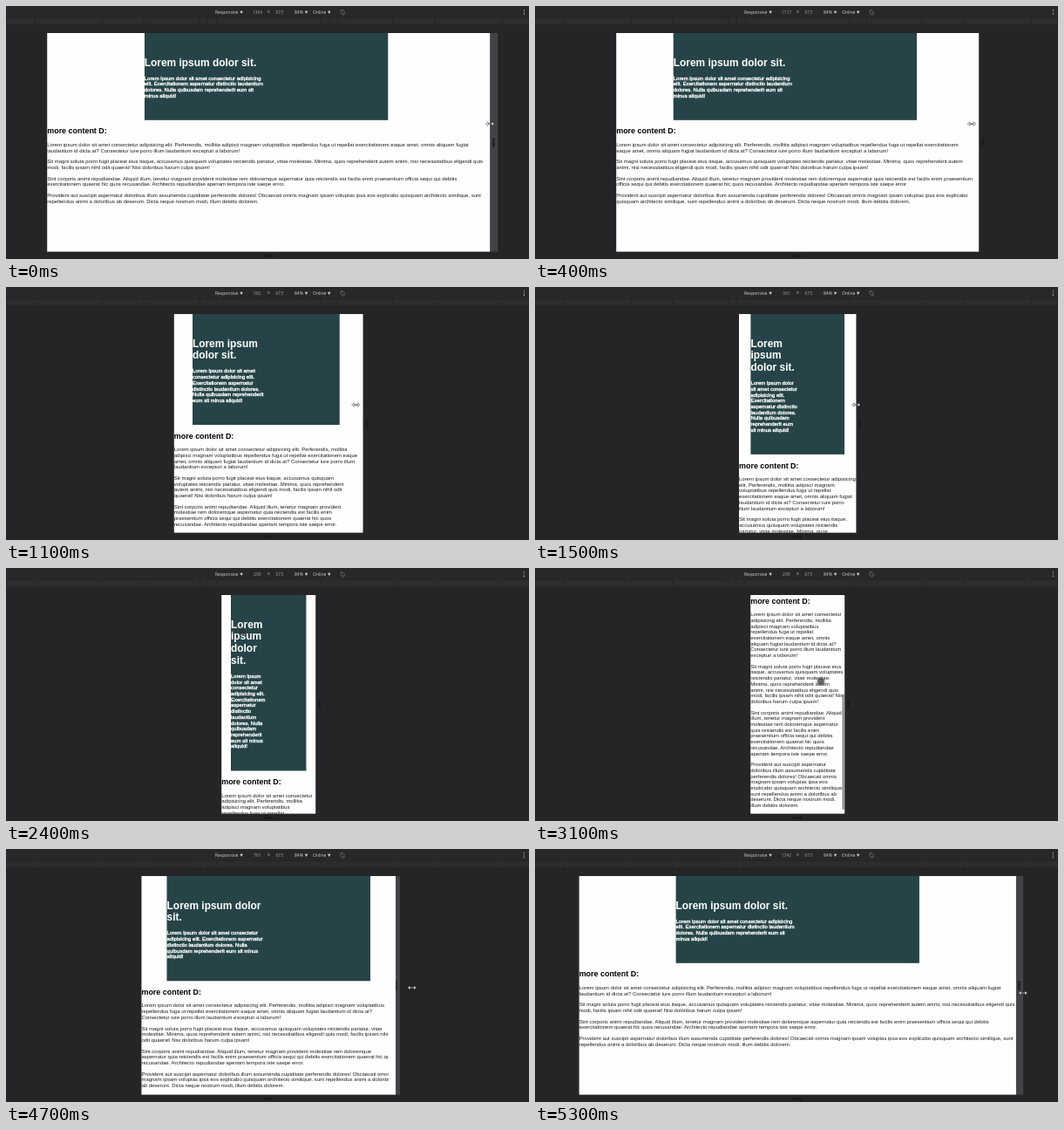
Recreate the animation shown at these times as an HTML page. Size 600 by 290 pixels, loop 5400 ms.

```html
<!DOCTYPE html>
<html lang="en">
<head>
<meta charset="utf-8">
<title>Responsive layout preview</title>
<style>
  html, body { margin: 0; width: 100%; height: 100%; overflow: hidden; background: #252427; }
  #stage { position: relative; width: 600px; height: 290px; overflow: hidden; background: #252427; }
  svg { position: absolute; inset: 0; font: 5px "Open Sans", sans-serif; }
  #device {
    position: absolute; top: 31px; left: 0; height: 673px; overflow: hidden;
    background: #fffefe; transform-origin: 0 0;
  }
  #clip { height: 100%; overflow: hidden; }
  #page { display: flow-root; font: 16px/18px "Liberation Sans", Arial, sans-serif; color: #000; }
  #page header {
    display: flow-root; box-sizing: border-box; width: 80%; max-width: 750px;
    margin: 0 auto; padding: 50.5px 0 49.5px; background: #264448; color: #fff;
  }
  header > * { width: 50%; }
  h1 { font-size: 32px; line-height: 37px; margin: 21.44px 0; }
  h2 { font-size: 24px; line-height: 27px; margin: 19.92px 0; }
  p { margin: 16px 0; color: #1c1c1c; }
  /* bold weight on regular advance widths */
  header p { color: #fff; -webkit-text-stroke: .9px #fff; }
</style>
</head>
<body>
<div id="stage">
  <svg width="600" height="290">
    <rect width="600" height="13" fill="#28272a"/>
    <rect y="14" width="600" height="7" fill="#2d2c2f"/>
    <g id="ticks" stroke="#232225" stroke-width=".8"></g>
    <g fill="#d3d3d5">
      <text x="240" y="9.2">Responsive</text>
      <text x="331" y="9.2">84%</text>
      <text x="352" y="9.2">Online</text>
      <path d="M268.4 5.7h3.4l-1.7 3.2zM342.8 5.7h3.4l-1.7 3.2zM369 5.7h3.4l-1.7 3.2z"/>
      <path d="M594.4 4.6v.01M594.4 7v.01M594.4 9.4v.01" stroke="#d3d3d5" stroke-width="1.2" stroke-linecap="round"/>
    </g>
    <g fill="#a2a2a6" text-anchor="middle">
      <text id="width" x="288.4" y="9.2"></text>
      <text x="301.3" y="9.2" font-size="6.5">×</text>
      <text x="313.8" y="9.2">673</text>
    </g>
    <g fill="none" stroke="#77777b" stroke-width=".7">
      <rect x="384.6" y="5.2" width="3" height="4" transform="rotate(45 386.1 7.2)"/>
      <path d="M383.4 6.2a3 3 0 0 1 2.7-2.2M388.8 8.2a3 3 0 0 1-2.7 2.2"/>
    </g>
    <rect x="296" y="285" width="10" height="3" fill="#1b1a1d"/>
    <g id="handle">
      <rect id="strip" y="31" width="9" height="250.6" fill="#434346"/>
      <rect x="2.8" y="151" width="3" height="11" fill="#1b1a1d" opacity=".7"/>
    </g>
  </svg>

  <div id="device"><div id="clip"><div id="page">
    <header>
      <h1>Lorem ipsum dolor sit.</h1>
      <p>Lorem ipsum dolor sit amet consectetur adipisicing elit. Exercitationem aspernatur distinctio laudantium dolores. Nulla quibusdam reprehenderit eum sit minus aliquid!</p>
    </header>
    <h2>more content D:</h2>
    <p>Lorem ipsum dolor sit amet consectetur adipisicing elit. Perferendis, mollitia adipisci magnam voluptatibus repellendus fuga ut repellat exercitationem eaque amet, omnis aliquam fugiat laudantium id dicta at? Consectetur iure porro illum laudantium excepturi a laborum!</p>
    <p>Sit magni soluta porro fugit placeat eius itaque, accusamus quisquam voluptates reiciendis pariatur, vitae molestiae. Minima, quos reprehenderit autem animi, nisi necessitatibus eligendi quis modi, facilis ipsam nihil odit quaerat! Nisi doloribus harum culpa ipsam!</p>
    <p>Sint corporis animi repudiandae. Aliquid illum, tenetur magnam provident molestiae rem doloremque aspernatur quia reiciendis est facilis enim praesentium officia sequi qui debitis exercitationem quaerat hic quos recusandae. Architecto repudiandae aperiam tempora iste saepe error.</p>
    <p>Provident aut suscipit aspernatur doloribus illum assumenda cupiditate perferendis dolores! Obcaecati omnis magnam ipsam voluptas ipsa eos explicabo quisquam architecto similique, sunt repellendus animi a doloribus ab deserunt. Dicta neque nostrum modi, illum debitis dolorem.</p>
  </div></div></div>

  <svg width="600" height="290">
    <defs><radialGradient id="soft">
      <stop offset=".55" stop-color="#333" stop-opacity=".75"/>
      <stop offset="1" stop-color="#555" stop-opacity=".1"/>
    </radialGradient></defs>
    <rect id="thumb" x="352.6" y="145" width="2" height="132" rx="1" fill="#808080"/>
    <circle id="touch" r="5.4" fill="url(#soft)"/>
    <path id="arrows" d="M-4.8 0l2.6-2.2v1.7h4.4v-1.7l2.6 2.2-2.6 2.2v-1.7h-4.4v1.7z" fill="#fff" stroke="#222" stroke-width=".5"/>
  </svg>
</div>
<script>
const LOOP = 5400, STEP = 100;
const SCALE = 0.3724, CENTER = 301.2, VIEW_HEIGHT = 673;
const WIDE = 1364, NARROW = 290, REGROWN = 1353;
const SHRINK_END = 1800, GROW_START = 4100, SCROLLBAR = 15;
const $ = id => document.getElementById(id);

const progress = (t, from, to) => Math.min(1, Math.max(0, (t - from) / (to - from)));
const mix = (a, b, u) => a + (b - a) * u;
// Ease in by the power `rise`, ease out by the power `settle`.
const ease = (u, rise, settle) => 1 - (1 - u ** rise) ** settle;
const arch = (t, from, to) => Math.sin(Math.PI * (t - from) / (to - from));

function deviceWidth(t) {
  return t < GROW_START
    ? mix(WIDE, NARROW, ease(progress(t, 0, SHRINK_END), 1.317, 1.76))
    : mix(NARROW, REGROWN, ease(progress(t, GROW_START, LOOP), 1.97, 2.38));
}

// time, x, y of the wandering touch pointer
const wander = [[2000, 361, 135], [2200, 345, 147], [2400, 271, 73], [2600, 328, 130], [3200, 328, 130], [3800, 356, 155]];

function pointerAt(t, edge) {
  if (t <= wander[0][0]) return [edge - 11 * arch(Math.min(t, SHRINK_END), 0, 1500), 135];
  if (t > wander.at(-1)[0]) return [edge + 5 + 18 * arch(t, 3900, 5400), 155 + 10 * progress(t, 4300, 5300)];
  const i = wander.findIndex(key => key[0] >= t);
  const [t0, x0, y0] = wander[i - 1], [t1, x1, y1] = wander[i];
  const u = progress(t, t0, t1);
  return [mix(x0, x1, u), mix(y0, y1, u)];
}

$("ticks").innerHTML = [320, 375, 425, 768, 1024, 1440].map(w => {
  const half = w * SCALE / 2;
  return `<path d="M${CENTER - half} 14v7M${CENTER + half} 14v7"/>`;
}).join("");

function draw(t) {
  const shown = deviceWidth(t);
  const lag = t > 4300 ? 23.5 * arch(t, 4300, 5350) : 0;
  const frame = shown + lag;
  const edge = CENTER + shown * SCALE / 2;

  $("width").textContent = Math.round(shown);
  $("device").style.width = frame + "px";
  $("device").style.transform = `translateX(${CENTER - frame * SCALE / 2}px) scale(${SCALE})`;
  $("clip").style.width = shown + "px";

  const page = $("page");
  page.style.width = frame - (t < 1300 ? SCROLLBAR : 0) + "px";
  const hidden = Math.max(0, page.offsetHeight - VIEW_HEIGHT);
  const scrolled = ease(progress(t, 2600, 3100), 1, 1.3);
  page.style.transform = `translateY(${-hidden * scrolled}px)`;

  $("handle").setAttribute("transform", `translate(${edge})`);
  $("strip").style.opacity = t < 300 || t >= 3900 ? 1 : 0;
  $("thumb").style.opacity = progress(t, 2600, 2700) - progress(t, 3300, 3700);

  const [x, y] = pointerAt(t, edge);
  const touching = t > 2000 && t < 3800;
  for (const id of ["touch", "arrows"]) {
    $(id).setAttribute("transform", `translate(${x} ${y})`);
    $(id).style.display = (id === "touch") === touching ? "" : "none";
  }
}

const start = performance.now();
function tick() {
  const t = (performance.now() - start) % LOOP;
  draw(Math.floor(t / STEP) * STEP);
  requestAnimationFrame(tick);
}
tick();
</script>
</body>
</html>
```
